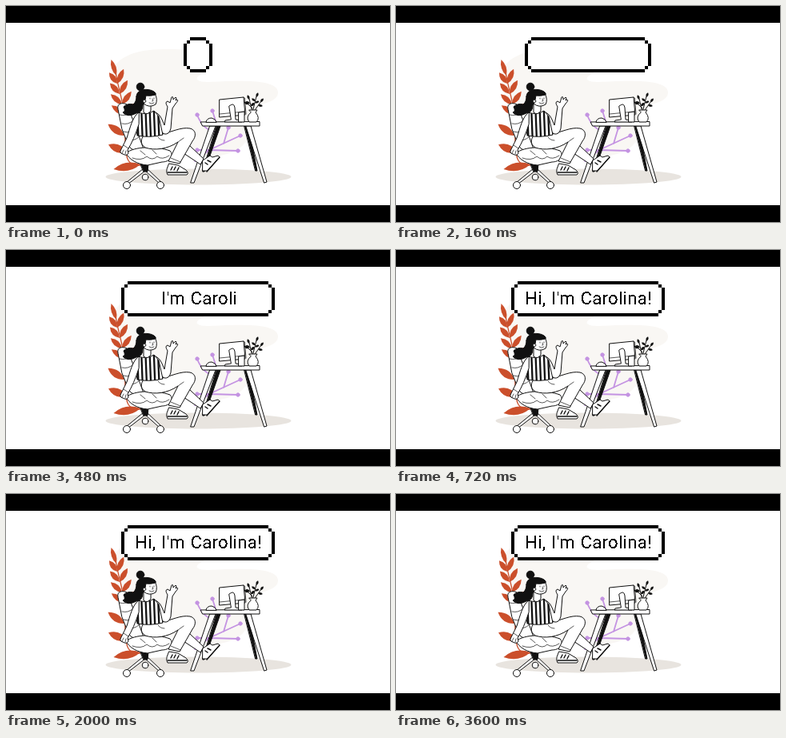
Recreate the animation shown at these times as an HTML page. Size 480 by 270 pixels, loop 3680 ms.

```html
<!DOCTYPE html>
<html lang="en">
<head>
<meta charset="utf-8">
<title>Greeting at the desk</title>
<style>
  html, body { margin: 0; width: 100%; height: 100%; overflow: hidden; background: #fff; }
  svg { display: block; width: 100%; height: 100%; }
  .ink { fill: none; stroke: #111; stroke-width: 1; stroke-linecap: round; stroke-linejoin: round; }
  .ink .w { fill: #fff; }
  .ink .k { fill: #111; }
  .ink .thin { stroke-width: .7; }
  .greeting { font: 22px Roboto, Arial, sans-serif; letter-spacing: .3px; word-spacing: 1px; text-anchor: middle; }
</style>
</head>
<body>
<svg viewBox="0 0 480 270">
  <defs>
    <clipPath id="reveal"><rect id="window" y="46" height="30"/></clipPath>
    <clipPath id="blouse"><path d="M166 133C172 136 180 134 185 131L191 138L196 161Q180 165 164 162L161 145Z"/></clipPath>
    <filter id="crisp" x="-5%" y="-20%" width="110%" height="140%">
      <feComponentTransfer><feFuncA type="discrete" tableValues="0 1"/></feComponentTransfer>
    </filter>
  </defs>

  <path fill="#f9f7f4" d="M132 90C132 65 160 54 198 54C228 53 256 58 257 72C257 82 236 86 239 92C245 98 270 93 300 94C325 94 340 99 340 108C340 120 320 121 315 126C309 142 306 172 288 180C262 194 232 188 205 178C165 164 132 125 132 90Z"/>
  <ellipse cx="240.500" cy="213.500" rx="116" ry="10" fill="#e8e4df"/>

  <g id="leaves" fill="#cb4f2b">
    <path d="M137 82C140 105 150 125 149 160S154 200 168 199" fill="none" stroke="#cb4f2b" stroke-width="1.300"/>
  </g>

  <g id="coral" fill="#c493e2" stroke="#c493e2" stroke-linecap="round">
    <path fill="none" stroke-width="1.800" d="M236 194L254 180L290 181M254 180L293 162M254 180Q264 166 264 150L258 131M265 158Q246 156 239 136M254 180L239 180M272 172L278 152"/>
  </g>

  <g class="ink">
    <!-- chair -->
    <path class="w" d="M140 129C138 122 145 120 151 123L162 151L172 179Q158 184 153 174L145 154Z"/>
    <path class="thin" d="M142 136Q150 138 155 133M145 147Q153 149 159 143M147 157Q156 160 163 153M151 167Q160 170 167 163"/>
    <path class="w" d="M172 203L150 221L152 223L174 206L192 222L194 220L176 203Z"/>
    <path class="k" d="M168 197L178 197L177 207L172 207Z"/>
    <g class="w"><circle cx="151" cy="224" r="4.500"/><circle cx="174" cy="214" r="3.800"/><circle cx="193" cy="224" r="4.500"/></g>
    <path class="w" d="M150 184C160 175 188 175 205 181C211 188 204 195 195 195L177 199C164 198 154 192 150 184Z"/>
    <path class="thin" d="M158 190Q169 194 176 188Q183 194 189 188Q195 193 204 187M168 181L174 186M183 180L188 185"/>

    <!-- desk supports -->
    <path class="k" d="M263 150L268 150L248 207L246 207Z"/>
    <path class="k" d="M298 150L303 150L314 206L312 206Z"/>
    <path class="w" d="M255 150L262 150L235 221L231 221Z"/>
    <path class="w" d="M300 150L306 150L326 220L323 221Z"/>

    <!-- extended leg -->
    <path class="w" d="M221 177L229 174L247 191L243 198L222 184Z"/>
    <path class="w" d="M246 193L255 187L258 189L265 187L267 189L252 206L246 206Z"/>
    <path d="M267 189L251 207M249 196L252 198M252 193L256 195" style="stroke-width:1.500"/>

    <!-- bent leg and shoe -->
    <path class="w" d="M172 162L194 160C207 158 218 151 230 153C238 155 238 163 233 169L217 197L203 194L215 170C202 179 186 181 174 177C168 173 168 167 172 162Z"/>
    <path class="thin" d="M215 170L222 165M206 190L218 195M190 164Q193 168 198 168"/>
    <path class="w" d="M204 197L215 199L225 205Q229 209 226 211L202 211Q200 208 201 204Z"/>
    <path d="M202 208L226 208M208 201L206 205M212 201L210 205M216 202L214 206" style="stroke-width:1.400"/>

    <!-- raised arm -->
    <path class="w" d="M184 132Q191 133 195 142L198 149L202 126Q198 120 202 119L205 121L207 114Q209 112 209 117L212 114Q214 114 212 118L214 117Q216 118 212 122L208 128L206 153Q204 161 198 160Q193 158 190 149Z"/>
    <!-- blouse -->
    <path class="w" d="M166 133C172 136 180 134 185 131L191 138L196 161Q180 165 164 162L161 145Z"/>
    <g id="stripes" clip-path="url(#blouse)" stroke-width="2.300"></g>
    <!-- resting arm -->
    <path class="w" d="M166 133C158 138 155 153 151 165L144 179Q141 184 146 185Q151 188 153 184L152 180Q160 167 166 148Z"/>
    <path class="thin" d="M147 174L153 178M145 184L147 180M149 185L150 181"/>

    <!-- head -->
    <path class="w" d="M172 121L172 133Q177 137 181 131L181 125Z"/>
    <path class="w" d="M172 110L186 109Q190 117 187 123Q179 128 172 122Z"/>
    <circle class="k" cx="168" cy="101" r="4.800"/>
    <path class="k" d="M163 113C163 104 177 102 185 107Q188 109 187 111Q180 113 175 112Q174 121 171 124Q171 133 163 134Q152 140 146 133Q150 132 147 126Q152 121 159 123Q163 120 163 113Z"/>
    <circle class="w thin" cx="173" cy="119" r="1.800"/>
    <path class="thin" d="M180 115L180 116M185 115L185 116M183 116L184 118.500L182.500 119M179 121Q182 123.500 185 121"/>

    <!-- desk top -->
    <path class="w" d="M243.500 145L317 144.500L317 150L246 150Z"/>
    <path class="w" d="M250 145Q251 140 257 140Q262 141 263 145Z"/>
    <path class="w" d="M267 117L297 114L299 136L267 139Z"/>
    <path class="thin" d="M267 135L298 132M297 114L298.500 115L300 135"/>
    <path class="w" d="M279 125Q285 120 286 127L287 142L295 143L295 145L273 145L274 143L281 142Z"/>
    <path class="w" d="M291 133L298 132L298 145L291 145Z"/>
    <path d="M308 133L304 116M308 133L313 113M309 133L319 119M308 128L302 122"/>
    <g id="sprigs" fill="#111" stroke="none"></g>
    <path class="w" d="M304 130L314 130L312 133Q318 140 313 145L304 145Q299 139 306 133Z"/>
  </g>

  <path id="panel" fill="#fff"/>
  <path id="border" fill="#000"/>
  <g clip-path="url(#reveal)">
    <text class="greeting" x="240.500" y="68" filter="url(#crisp)">Hi, I'm Carolina!</text>
  </g>
  <path d="M0 0H480V21H0ZM0 249H480V270H0Z"/>
</svg>

<script>
const byId = id => document.getElementById(id);

function add(parentId, tag, attributes) {
  const node = document.createElementNS("http://www.w3.org/2000/svg", tag);
  for (const [name, value] of Object.entries(attributes)) node.setAttribute(name, value);
  byId(parentId).append(node);
}

// A pointed leaf growing from (x, y); angle 0 points right.
function leaf(parentId, x, y, angle, length, width) {
  const half = length / 2;
  add(parentId, "path", {
    d: `M0 0Q${half} ${-width} ${length} 0Q${half} ${width} 0 0Z`,
    transform: `translate(${x} ${y}) rotate(${angle})`
  });
}

leaf("leaves", 138, 87, -108, 21, 6);
for (let i = 0; i < 4; i++) {
  const x = 139 + i * 3, y = 97 + i * 13;
  leaf("leaves", x, y, -126 - i * 6, 17 + i, 7);
  leaf("leaves", x, y, -66 + i * 6, 20, 7);
}
leaf("leaves", 148, 162, -145, 25, 9);
leaf("leaves", 151, 183, -157, 25, 10);
leaf("leaves", 168, 198, 170, 34, 10);

for (const [cx, cy] of [[258, 131], [239, 136], [278, 152], [293, 162], [290, 181], [239, 180]])
  add("coral", "circle", { cx, cy, r: 2.2 });

for (let x = 164; x < 198; x += 5.2)
  add("stripes", "path", { d: `M${x} 129L${x + 1.5} 166` });

for (const [x, y, angle] of [[304, 117, -110], [305, 122, -155], [306, 125, -40], [313, 114, -70],
                             [312, 119, -145], [311, 121, -20], [318, 120, -50], [315, 124, 10], [303, 123, -150]])
  leaf("sprigs", x, y, angle, 6, 3);

const LOOP = 3680, STEP = 80, CENTER = 240;
const easeOut = (progress, power) => 1 - (1 - Math.min(1, Math.max(0, progress))) ** power;
const box = (x, y, w, h) => `M${x} ${y}h${w}v${h}h${-w}Z`;

function drawPanel(half) {
  const left = Math.round(CENTER - half), right = Math.round(CENTER + half);
  const top = 39, bottom = 83, p = 4;
  const width = right - left, height = bottom - top;
  byId("panel").setAttribute("d", box(left + p, top + p, width - 2 * p, height - 2 * p));
  byId("border").setAttribute("d", [
    box(left + 2 * p, top, width - 4 * p, p),
    box(left + 2 * p, bottom - p, width - 4 * p, p),
    box(left, top + 2 * p, p, height - 4 * p),
    box(right - p, top + 2 * p, p, height - 4 * p),
    ...[left + p, right - 2 * p].flatMap(x => [box(x, top + p, p, p), box(x, bottom - 2 * p, p, p)])
  ].join(""));
}

function render(now) {
  const time = Math.floor((now % LOOP) / STEP) * STEP;
  drawPanel(18 + 78 * easeOut(time / 240, 1.4));
  const half = 82 * easeOut((time - 200) / 600, 1.55);
  byId("window").setAttribute("x", CENTER - half);
  byId("window").setAttribute("width", 2 * half);
}

const start = performance.now();
function tick() {
  render(performance.now() - start);
  requestAnimationFrame(tick);
}
tick();
</script>
</body>
</html>
```
